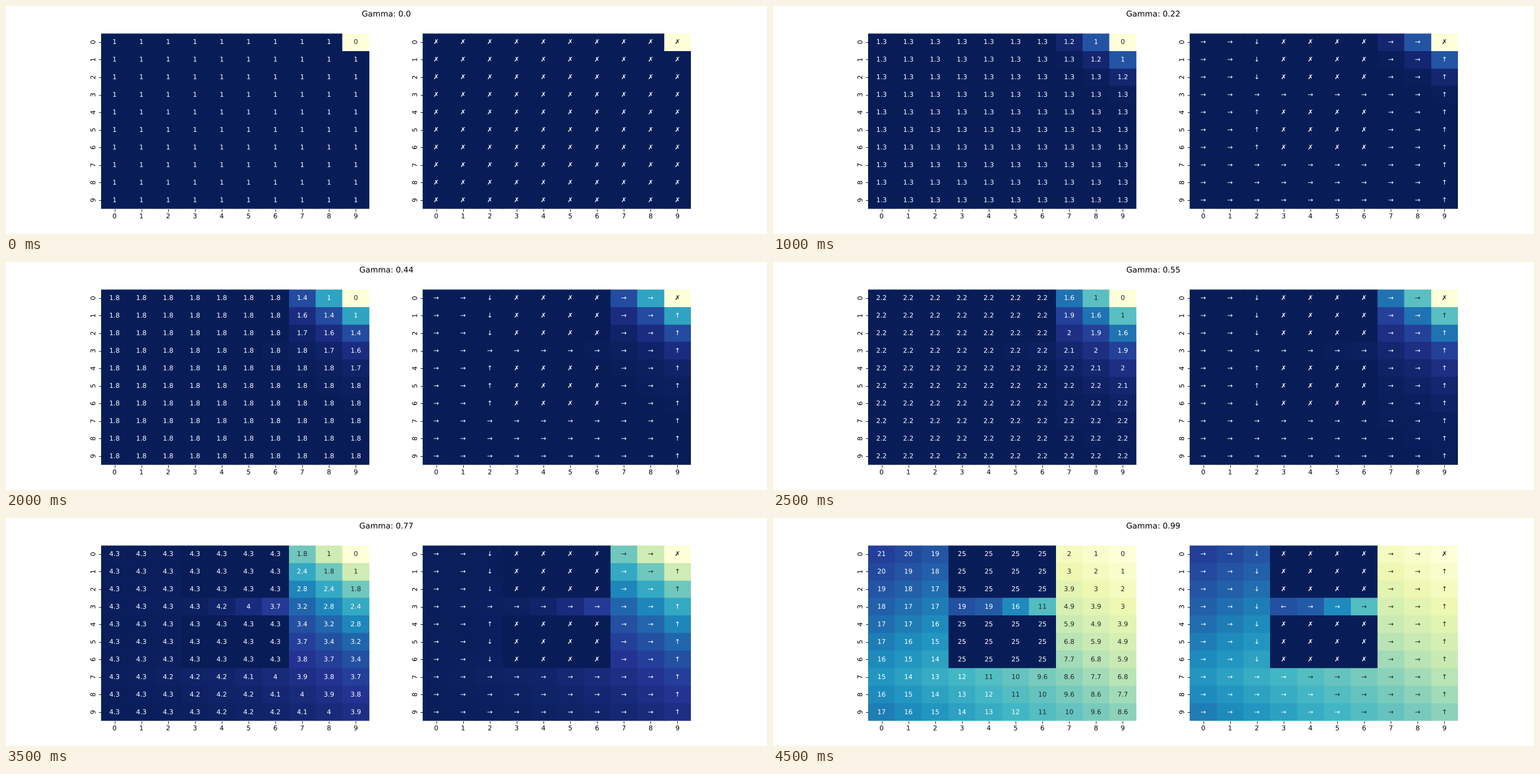
A matplotlib script for the animation above (5 s loop, 1280 px wide and 384 px high).

```python
import matplotlib.pyplot as plt
import numpy as np
from matplotlib.animation import FuncAnimation
from matplotlib.collections import PolyCollection
from matplotlib.patheffects import Normal
from matplotlib.text import Text
from matplotlib.transforms import IdentityTransform

HEIGHT = 384
UNIT = 0.8     # layout grid step in pixels
OVERLAP = 1    # pixels each cell reaches under the next, so no seams show
SIZE, SWEEPS, FRAMES = 10, 28, 10
GOAL = (0, 9)
ACTIONS = {"✗": (0, 0), "→": (0, 1), "↓": (1, 0), "↑": (-1, 0), "←": (0, -1)}
SYMBOLS = list(ACTIONS)
RIGHT, LEFT = SYMBOLS.index("→"), SYMBOLS.index("←")

# Inside the corridor a move succeeds, reverses, stalls, or slips into a pit.
P_MOVE, P_BACK, P_STAY = 0.65, 0.055, 0.045
CORRIDOR = (3, slice(3, 7))
PITS = np.zeros((SIZE, SIZE), bool)
PITS[0:3, 3:7] = PITS[4:7, 3:7] = True

plt.rcParams["font.family"] = "DejaVu Sans"


def shifted(grid, dr, dc):
    padded = np.pad(grid, 1, mode="edge")
    return padded[1 + dr:1 + dr + SIZE, 1 + dc:1 + dc + SIZE]


def solve(gamma):
    """Value iteration, tracking how much each cell saves compared with a pit."""
    saving = np.zeros((SIZE, SIZE))
    pit_cost = 0.0
    for _ in range(SWEEPS):
        pit_cost = 1 + gamma * pit_cost
        moves = np.array([shifted(saving, *step) for step in ACTIONS.values()])
        q = gamma * moves
        stay, right, left = (moves[i][CORRIDOR] for i in (0, RIGHT, LEFT))
        for i in range(len(SYMBOLS)):
            q[i][CORRIDOR] = 0
        q[RIGHT][CORRIDOR] = gamma * (P_MOVE * right + P_BACK * left + P_STAY * stay)
        q[LEFT][CORRIDOR] = gamma * (P_MOVE * left + P_BACK * right + P_STAY * stay)
        q[:, PITS] = 0
        q[:, GOAL[0], GOAL[1]] = pit_cost
        saving = q.max(axis=0)
    q[q < 2e-17] = 0  # differences lost to rounding count as ties
    return np.round(pit_cost - saving, 9), q.argmax(axis=0)


def text_color(rgba):
    rgb = np.asarray(rgba[:3])
    linear = np.where(rgb <= 0.03928, rgb / 12.92, ((rgb + 0.055) / 1.055) ** 2.4)
    return "0.15" if linear @ [0.2126, 0.7152, 0.0722] > 0.408 else "white"


def snap(pixels):
    return np.floor(pixels / UNIT + 0.5) * UNIT


def make_heatmap(ax):
    centers = np.arange(SIZE) + 0.5
    ax.set(xlim=(0, SIZE), ylim=(SIZE, 0))
    ax.set_xticks(centers, range(SIZE))
    ax.set_yticks(centers, range(SIZE), rotation="vertical", va="center")
    ax.spines[:].set_visible(False)

    # Cells and their labels are placed in pixels, with y measured downwards.
    box = ax.bbox
    xs = np.linspace(box.x0, box.x1, SIZE + 1)
    ys = np.linspace(HEIGHT - box.y1, HEIGHT - box.y0, SIZE + 1)
    in_pixels = dict(transform=IdentityTransform(), clip_on=False)
    polygons, texts = [], []
    for row in range(SIZE):
        top, bottom = snap(ys[row:row + 2])
        bottom += OVERLAP * (row < SIZE - 1)
        baseline = snap((ys[row] + ys[row + 1]) / 2 + 4 * UNIT)
        for col in range(SIZE):
            left, right = snap(xs[col:col + 2])
            right += OVERLAP * (col < SIZE - 1)
            polygons.append([(left, HEIGHT - top), (right, HEIGHT - top),
                             (right, HEIGHT - bottom), (left, HEIGHT - bottom)])
            texts.append(ax.text((xs[col] + xs[col + 1]) / 2, HEIGHT - baseline, "",
                                 ha="center", va="baseline", **in_pixels))
    cells = PolyCollection(polygons, cmap="YlGnBu", linewidths=0, edgecolors="none",
                           antialiaseds=True, snap=False, **in_pixels)
    ax.add_collection(cells, autolim=False)
    return cells, texts


def fill_heatmap(heatmap, values, labels):
    cells, texts = heatmap
    cells.set_array(values.ravel())
    cells.set_clim(values.min(), values.max())
    for text, label, rgba in zip(texts, labels, cells.to_rgba(values.ravel())):
        text.set_text(label)
        text.set_color(text_color(rgba))


fig, axes = plt.subplots(1, 2, figsize=(16, 4.8), dpi=80)
title = fig.suptitle("")
value_map, policy_map = (make_heatmap(ax) for ax in axes)
for label in fig.findobj(Text):
    label.set_path_effects([Normal()])  # smooth outlines instead of hinted glyphs


def update(frame):
    gamma = round(0.11 * frame, 2)
    values, policy = solve(gamma)
    title.set_text(f"Gamma: {gamma}")
    fill_heatmap(value_map, values, [f"{v:.2g}" for v in values.ravel()])
    fill_heatmap(policy_map, values, [SYMBOLS[i] for i in policy.ravel()])


anim = FuncAnimation(fig, update, frames=FRAMES, init_func=lambda: update(0),
                     interval=500, repeat=True, repeat_delay=0)
plt.show()
```
